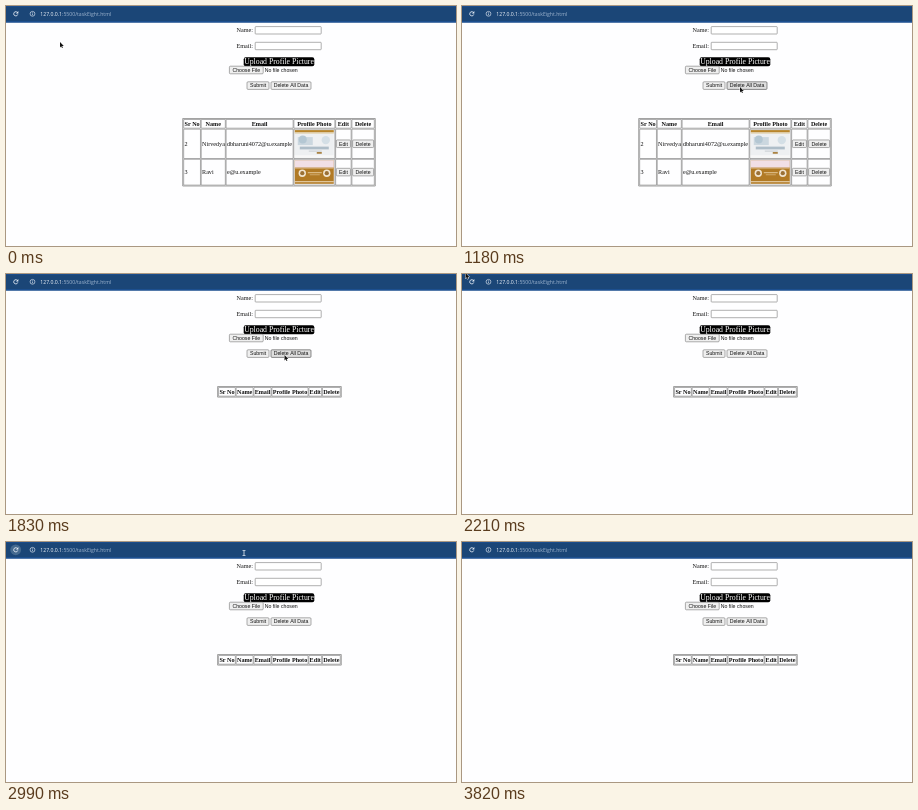
Animation of 450x240 px, one loop 3950 ms. Source, as an HTML page with a canvas:

```html
<!DOCTYPE html>
<html lang="en">
<head>
<meta charset="utf-8">
<title>Profile form</title>
<style>
html, body { margin: 0; width: 100%; height: 100%; overflow: hidden; background: #fefeff; }
canvas { display: block; width: 450px; height: 240px; }
</style>
</head>
<body>
<canvas id="stage"></canvas>
<script>
const canvas = document.getElementById('stage');
const ctx = canvas.getContext('2d');
const dpr = window.devicePixelRatio || 1;
canvas.width = 450 * dpr;
canvas.height = 240 * dpr;
ctx.scale(dpr, dpr);

const LOOP = 3950;
const CLEARED = 1830;
const SERIF = '6.15px "Liberation Serif", serif';
const BOLD = 'bold ' + SERIF;
const SANS = '5.2px "Liberation Sans", sans-serif';
const URL_FONT = '5.15px "Open Sans", sans-serif';

const HEADS = ['Sr No', 'Name', 'Email', 'Profile Photo', 'Edit', 'Delete'];
const FULL = [16.8, 24.1, 67, 41, 15.5, 22.4];
const EMPTY = [16.8, 17, 17.2, 36.2, 12.8, 17.9];
const GAP = 0.77;
const ROWS = [
  { y: 123.2, h: 29.3, cells: ['2', 'Nirvedya', 'dbharuni4072@u.example'], photo: sitePhoto },
  { y: 153.3, h: 25.8, cells: ['3', 'Ravi', 'e@u.example'], photo: cardPhoto }
];

// Pointer poses, each held until the next: time, x, y
const PATH = [
  [0, 54, 36], [60, 46, 31], [120, 22, 17], [180, 8.5, 10],
  [440, 8, 9.5], [860, 12, 12], [920, 118, 43], [980, 252, 77],
  [1180, 278, 81], [1510, 278.5, 81],
  [2090, 205, 58], [2150, 70, 16], [2210, 3.5, -1], [2270, 6, 6], [2330, 8, 9],
  [2870, 20, 11], [2930, 108, 11], [2990, 238, 11], [3050, 325, 10],
  [3110, 391, 9], [3170, 406, 9], [3230, -20, -20]
];

function fill(x, y, w, h, color) {
  ctx.fillStyle = color;
  ctx.fillRect(x, y, w, h);
}

function box(x, y, w, h, r, bg, line, weight = 0.6) {
  ctx.beginPath();
  ctx.roundRect(x, y, w, h, r);
  if (bg) { ctx.fillStyle = bg; ctx.fill(); }
  if (line) { ctx.strokeStyle = line; ctx.lineWidth = weight; ctx.stroke(); }
}

function disc(x, y, r, color) {
  ctx.fillStyle = color;
  ctx.beginPath();
  ctx.arc(x, y, r, 0, Math.PI * 2);
  ctx.fill();
}

function text(str, x, y, font, color = '#111', align = 'left') {
  ctx.font = font;
  ctx.fillStyle = color;
  ctx.textAlign = align;
  ctx.fillText(str, x, y);
}

function button(label, x, y, w, hot) {
  box(x, y, w, 7.6, 1, hot ? '#dedede' : '#efefef', hot ? '#444' : '#767676', 0.6);
  text(label, x + w / 2, y + 5.6, SANS, '#111', 'center');
}

function drawBar(hover) {
  fill(0, 0, 450, 16.5, '#1b4677');
  fill(0, 0, 450, 0.8, '#1c4f91');
  fill(0, 15.3, 450, 1.2, '#1d539b');
  if (hover) disc(9.7, 7.8, 5.4, '#44698f');

  ctx.strokeStyle = '#f0f5fb';
  ctx.lineWidth = 0.8;
  ctx.beginPath();
  ctx.arc(9.8, 7.8, 2.1, 0.3, 5.4);
  ctx.stroke();
  ctx.fillStyle = '#f0f5fb';
  ctx.beginPath();
  ctx.moveTo(12.3, 5.1);
  ctx.lineTo(12.3, 7.4);
  ctx.lineTo(10, 7.4);
  ctx.fill();

  ctx.lineWidth = 0.6;
  ctx.beginPath();
  ctx.arc(26.5, 7.8, 2.4, 0, Math.PI * 2);
  ctx.stroke();
  fill(26.2, 7.4, 0.6, 1.8, '#f0f5fb');
  fill(26.2, 6.3, 0.6, 0.6, '#f0f5fb');

  const host = '127.0.0.1';
  text(host, 34.3, 9.8, URL_FONT, '#f2f6fb');
  text(':5500/taskEight.html', 34.3 + ctx.measureText(host).width, 9.8, URL_FONT, '#9fb5cf');
}

function drawForm(hot) {
  [['Name:', 20.6], ['Email:', 36.3]].forEach(([label, y]) => {
    text(label, 230.5, y + 5.3, SERIF);
    box(249.2, y, 66, 7.4, 0.6, '#fff', '#7b7b7b');
  });
  box(237.7, 51.2, 70.6, 9, 2, '#000');
  text('Upload Profile Picture', 273, 58.3, '7.75px "Liberation Serif", serif', '#fff', 'center');
  button('Choose File', 223.4, 60.2, 33.8);
  text('No file chosen', 258.8, 65.8, SANS);
  button('Submit', 241, 75.8, 22);
  button('Delete All Data', 265, 75.8, 40, hot);
}

function sitePhoto(x, y) {
  fill(x, y, 39, 27.5, '#eef0f2');
  fill(x, y, 39, 2.3, '#b8852c');
  fill(x, y + 2.3, 39, 1.2, '#e0cda6');
  fill(x + 3, y + 7, 15, 8, '#cbd7df');
  disc(x + 8, y + 9.5, 4, '#b4c7d3');
  disc(x + 31, y + 10, 4.2, '#d4dfe6');
  fill(x + 5, y + 16.5, 29, 2.8, '#aebdc8');
  fill(x + 14, y + 20.5, 13, 1, '#c9ced3');
  fill(x + 22, y + 22, 5, 1.6, '#a47831');
  fill(x, y + 25, 39, 2.5, '#f8f8f8');
}

function cardPhoto(x, y) {
  fill(x, y, 39, 23.6, '#b17a25');
  fill(x, y, 39, 7.5, '#f1dfe5');
  fill(x, y + 7.5, 39, 1.2, '#cda363');
  [7.5, 32].forEach(dx => {
    disc(x + dx, y + 13, 3.7, '#f0e4cf');
    disc(x + dx, y + 13, 2.1, '#9b7136');
  });
  fill(x + 13, y + 12, 14, 1, '#e3c798');
  fill(x + 15, y + 14.2, 10, 0.8, '#d7b57b');
  fill(x, y + 21, 39, 1, '#ead8b8');
}

function tableRow(x, y, h, widths, draw) {
  widths.forEach((w, i) => {
    box(x, y, w, h, 0, null, '#858585', 0.65);
    draw(i, x, w);
    x += w + GAP;
  });
}

function drawTable(cleared) {
  const widths = cleared ? EMPTY : FULL;
  const left = cleared ? 211.6 : 176.7;
  const total = widths.reduce((sum, w) => sum + w + GAP, GAP);
  const start = left + GAP + 0.2;
  box(left, 112.5, total + 0.4, cleared ? 10.6 : 67.5, 0, null, '#858585', 0.75);
  tableRow(start, 113.5, 8.7, widths, (i, x, w) =>
    text(HEADS[i], x + w / 2, 119.9, BOLD, '#111', 'center'));
  if (cleared) return;
  ROWS.forEach(({ y, h, cells, photo }) => {
    const mid = y + h / 2;
    tableRow(start, y, h, widths, (i, x, w) => {
      if (i < 3) text(cells[i], x + 0.8, mid + 2, SERIF);
      else if (i === 3) photo(x + 0.9, y + 0.9);
      else button(HEADS[i], x + 0.7, mid - 3.9, w - 1.4);
    });
  });
}

function drawArrow(x, y) {
  const pts = [[0, 0], [0, 5.4], [1.2, 4.3], [2, 6.1], [2.9, 5.7], [2.1, 4], [3.8, 3.9]];
  ctx.beginPath();
  pts.forEach(([dx, dy]) => ctx.lineTo(x + dx, y + dy));
  ctx.closePath();
  ctx.strokeStyle = '#fff';
  ctx.lineWidth = 0.9;
  ctx.stroke();
  ctx.fillStyle = '#111';
  ctx.fill();
}

function drawBeam(x, y) {
  fill(x - 0.4, y - 2.6, 0.8, 5.2, '#e6edf5');
  fill(x - 1.5, y - 2.9, 3, 0.7, '#e6edf5');
  fill(x - 1.5, y + 2.2, 3, 0.7, '#e6edf5');
}

function render(t) {
  const [, x, y] = PATH.findLast(p => p[0] <= t);
  const onReload = (t >= 180 && t < 920) || (t >= 2270 && t < 3050);
  const onDelete = t >= 1180 && t < 2090;
  fill(0, 0, 450, 240, '#fefeff');
  drawBar(onReload);
  drawForm(onDelete);
  drawTable(t >= CLEARED);
  if (t >= 2930) drawBeam(x, y);
  else drawArrow(x, y);
}

const began = performance.now();
function tick() {
  render((performance.now() - began) % LOOP);
  requestAnimationFrame(tick);
}
tick();
</script>
</body>
</html>
```
